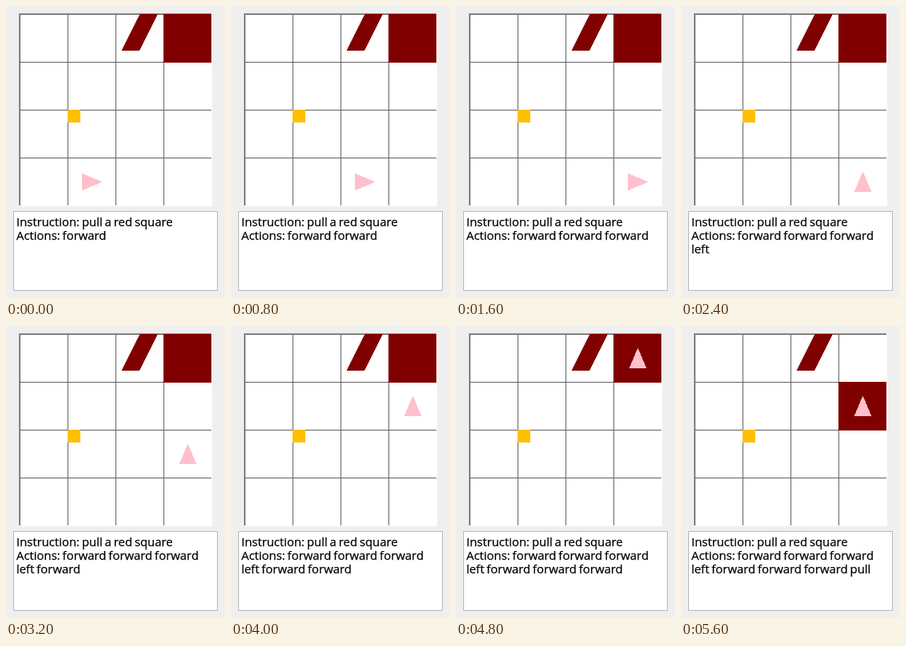
An HTML page for the animation above (6.4 s loop, 274 by 366 pixels).

```html
<!DOCTYPE html>
<html lang="en">
<head>
<meta charset="utf-8">
<title>Grid agent</title>
<style>
  html, body { margin: 0; width: 100%; height: 100%; overflow: hidden; background: #efefef; }
  svg { display: block; width: 274px; height: 366px; }
  text {
    font: 14.9px "Open Sans", "Noto Sans", sans-serif;
    word-spacing: -1px;
    fill: #000;
    stroke: #000;
    stroke-width: 0.25px;
  }
</style>
</head>
<body>
<svg viewBox="0 0 274 366">
  <g shape-rendering="crispEdges">
    <rect x="16" y="9" width="242" height="242" fill="#fff"/>
    <path d="M16 9h241v1h-240v240h-1z" fill="#9f9f9f"/>
    <path id="grid" stroke="#646464"/>
    <path d="M167.5 10H190L167 56H144.5z" fill="#800000"/>
    <rect x="77" y="130" width="16" height="16" fill="#ffbf00"/>
    <rect id="square" x="197" width="60" height="61" fill="#800000"/>
    <path id="agent" d="M-12 -10L12 0L-12 10z" fill="#ffc0cb" stroke="#ffc0cb" stroke-linejoin="round"/>
  </g>
  <rect x="9.5" y="257.5" width="255" height="99" fill="#fff" stroke="#b8b8b8"/>
  <text x="13" y="276">Instruction: pull a red square</text>
  <text id="line1" x="13" y="293"></text>
  <text id="line2" x="13" y="310"></text>
</svg>
<script>
const CELL = 60, LEFT = 17, TOP = 10, STEP_MS = 800;
const actions = ["forward", "forward", "forward", "left", "forward", "forward", "forward", "pull"];
const byId = id => document.getElementById(id);
const [grid, square, agent, line1, line2] = ["grid", "square", "agent", "line1", "line2"].map(byId);

grid.setAttribute("d", [0, 1, 2, 3].map(i =>
  `M${LEFT + i * CELL + 0.5} ${TOP}v240M${LEFT} ${TOP + i * CELL + 0.5}h240`).join(""));

function stateAfter(count) {
  const state = { col: 0, row: 3, up: false, squareRow: 0 };
  for (const action of actions.slice(0, count)) {
    if (action === "left") state.up = true;
    else if (action === "pull") state.row = ++state.squareRow;
    else if (state.up) state.row--;
    else state.col++;
  }
  return state;
}

function draw(now) {
  const count = Math.floor(now / STEP_MS) % actions.length + 1;
  const { col, row, up, squareRow } = stateAfter(count);
  const x = LEFT + (col + 0.5) * CELL + 0.5, y = TOP + (row + 0.5) * CELL + 0.5;
  agent.setAttribute("transform", `translate(${x} ${y}) rotate(${up ? -90 : 0})`);
  square.setAttribute("y", TOP + squareRow * CELL);
  line1.textContent = "Actions: " + actions.slice(0, Math.min(count, 3)).join(" ");
  line2.textContent = actions.slice(3, count).join(" ");
}

const start = performance.now();
function tick() {
  draw(performance.now() - start);
  requestAnimationFrame(tick);
}
tick();
</script>
</body>
</html>
```
